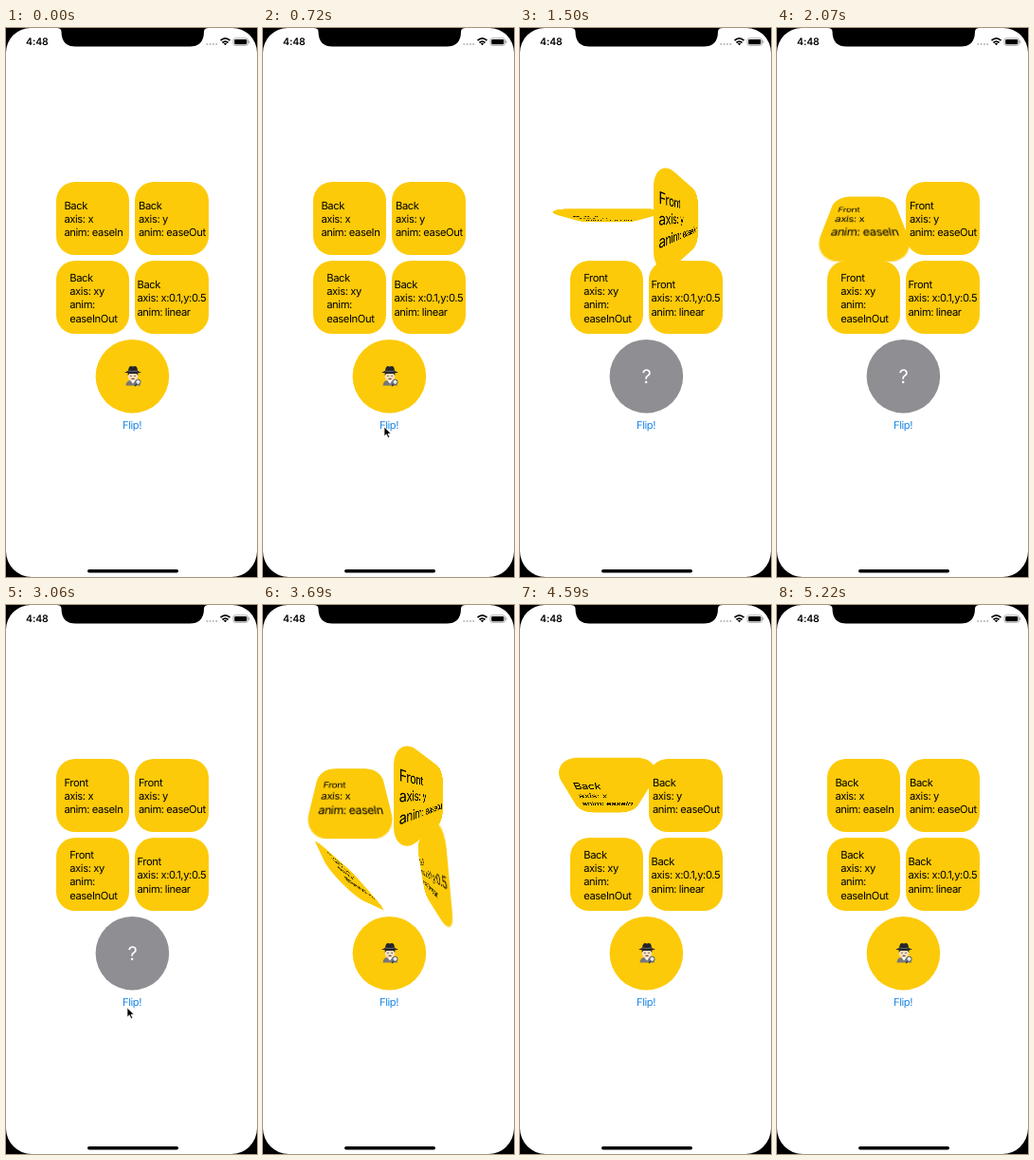
Animation, 265 px wide and 578 px high, one loop 5.49 s. Source, as an HTML page:

```html
<!DOCTYPE html>
<html lang="en">
<head>
<meta charset="utf-8">
<title>Flip cards</title>
<style>
  html, body { margin: 0; width: 100%; height: 100%; overflow: hidden; background: #fff; }
  #stage {
    position: relative; width: 265px; height: 578px; overflow: hidden; background: #fff;
    font: 11.2px/14.35px Inter, Roboto, sans-serif; letter-spacing: -.4px; color: #000;
    text-rendering: geometricPrecision;
  }
  #stage > svg { position: absolute; left: 0; top: 0; }
  .card {
    position: absolute; width: 77.5px; height: 77.5px; border-radius: 20px;
    background: #fcca08; display: flex; align-items: center; white-space: pre;
  }
  .card span { position: relative; top: .8px; }
  #flip { position: absolute; left: 103px; width: 60px; top: 410.5px; text-align: center; color: #1c87e5; }
</style>
</head>
<body>
<div id="stage">
  <svg id="screen" width="265" height="578" viewBox="0 0 265 578">
    <g id="avatar">
      <circle cx="133.4" cy="366.7" r="38.8" fill="#fcca08"/>
      <path d="M126.500 376.500q0-6 7.500-6t8 6z" fill="#77777a"/>
      <path d="M131 370.500l3 4 3-4z" fill="#fff"/>
      <circle cx="134" cy="366.500" r="5.300" fill="#f6dfc0"/>
      <path d="M128.700 366q-.5-3 1-4h8.600q1.500 1 1 4l-1.500-2h-7.600z" fill="#332c28"/>
      <path d="M125 362.700q3-.8 4-2 .5-4.700 3-4.700 2 .8 4 0 2.700 0 3 4.700 1 1.200 4 2-8 2.300-18 0z" fill="#25252a"/>
      <path d="M129 361q5 1.200 10 0" fill="none" stroke="#66666c"/>
      <path d="M131.300 366.300h1.200M135.500 366.300h1.200M132.500 369.300h3" stroke="#3b2a20"/>
      <circle cx="139.500" cy="372.700" r="2.600" fill="#dfe8ee" stroke="#55555a"/>
      <path d="M138 375l-2 2" stroke="#33333a" stroke-width="1.300"/>
    </g>
    <g id="mystery">
      <circle cx="133.4" cy="366.7" r="38.8" fill="#8e8e93"/>
      <text x="133.300" y="374" font-size="20" fill="#fff" text-anchor="middle">?</text>
    </g>
  </svg>
  <div id="flip">Flip!</div>
  <svg width="265" height="578" viewBox="0 0 265 578">
    <path fill-rule="evenodd" d="M0 0H265V578H0ZM26 0A26 26 0 0 0 0 26V551A27 27 0 0 0 27 578H238A27 27 0 0 0 265 551V26A26 26 0 0 0 239 0Z"/>
    <path d="M53.500 0Q58.500 0 58.500 4C58.500 15 64.500 19.500 73.500 19.500H194C203 19.500 209 15 209 4Q209 0 214 0Z"/>
    <text x="21" y="18" font-size="10.500" font-weight="600" letter-spacing="-.1">4:48</text>
    <path d="M212.300 17h12" stroke="#b9b9bc" stroke-width="2.200" stroke-linecap="round" stroke-dasharray="0 3.300"/>
    <g fill="none" stroke="#000" stroke-width="1.700">
      <path d="M226.500 13.200q5-4.600 10 0M228.500 15.500q3-2.700 6 0"/>
    </g>
    <path d="M229.800 16.500q1.700-1.300 3.400 0l-1.700 1.800z"/>
    <rect x="240" y="10.800" width="15.500" height="7.600" rx="2.200" fill="none" stroke="#999" stroke-width=".8"/>
    <rect x="241.200" y="12" width="13.100" height="5.200" rx="1.200"/>
    <path d="M256.800 13.300v2.600" stroke="#999"/>
    <rect x="86" y="570" width="96" height="3.400" rx="1.700"/>
    <path id="cursor" d="M0 0V9.800L2.300 7.700 4 11.500 5.700 10.700 4 7.100H7.200Z" stroke="#fff" stroke-width=".7"/>
  </svg>
</div>
<script>
const LOOP = 5490, TO_FRONT = 860, TO_BACK = 3458, HOLD = 10;

// Cubic bezier easing, solved by bisection.
function bezier(x1, y1, x2, y2) {
  const at = (a, b, s) => 3 * a * s * (1 - s) ** 2 + 3 * b * s * s * (1 - s) + s ** 3;
  return x => {
    let lo = 0, hi = 1;
    for (let i = 0; i < 24; i++) {
      const mid = (lo + hi) / 2;
      if (at(x1, x2, mid) < x) lo = mid; else hi = mid;
    }
    return at(y1, y2, lo);
  };
}
const linear = x => x;
const easeIn = bezier(.42, 0, 1, 1);
const easeOut = bezier(0, 0, .58, 1);
const easeInOut = bezier(.42, 0, .58, 1);
const softIn = bezier(.3, .2, .8, .8);

// Each flip has two halves of length `half`; the face changes edge-on.
const cards = [
  { x: 52.95, y: 161.7, pad: 8.5, axis: '1,0,0', half: 700, ease: [softIn, easeIn],
    text: 'axis: x\nanim: easeIn' },
  { x: 136.3, y: 161.7, pad: 3.7, axis: '0,1,0', half: 520, ease: [easeOut, easeOut],
    text: 'axis: y\nanim: easeOut' },
  { x: 52.95, y: 244.9, pad: 14.3, axis: '1,1,0', half: 285, ease: [easeInOut, easeInOut],
    text: 'axis: xy\nanim:\neaseInOut' },
  { x: 136.3, y: 244.9, pad: 2.2, axis: '.1,.5,0', half: 190, ease: [linear, linear],
    text: 'axis: x:0.1,y:0.5\nanim: linear' }
];

const $ = id => document.getElementById(id);
for (const c of cards) {
  c.el = document.createElement('div');
  c.el.className = 'card';
  c.label = document.createElement('span');
  c.label.style.marginLeft = c.pad + 'px';
  c.el.style.left = c.x + 'px';
  c.el.style.top = c.y + 'px';
  c.el.append(c.label);
  $('stage').insertBefore(c.el, $('flip'));
}

function drawCard(c, t) {
  const back = t >= TO_BACK;
  const u = t - (back ? TO_BACK : TO_FRONT);
  const second = u >= c.half + HOLD;
  const part = (second ? u - c.half - HOLD : u) / c.half;
  const k = c.ease[+second](Math.min(1, Math.max(0, part)));
  const angle = (second ? 90 * k - 90 : 90 * k) * (back ? 1 : -1);
  const word = second === back ? 'Back' : 'Front';
  if (c.word !== word) c.label.textContent = (c.word = word) + '\n' + c.text;
  c.el.style.transform = Math.abs(angle) > .01
    ? `perspective(77.5px) rotate3d(${c.axis},${angle}deg)` : 'none';
}

function drawCursor(t) {
  const first = t >= 480 && t < 840;
  const second = t >= 2880 && t < 3430;
  const k = Math.min(1, Math.max(0, (t - 2880) / 170));
  const [x, y] = first ? [128, 420] : [124 + 4 * k, 430 - 6 * k];
  $('cursor').setAttribute('transform', `translate(${x} ${y})`);
  $('cursor').style.display = first || second ? '' : 'none';
}

function draw(t) {
  cards.forEach(c => drawCard(c, t));
  const hidden = t >= TO_FRONT && t < TO_BACK;
  $('avatar').style.display = hidden ? 'none' : '';
  $('mystery').style.display = hidden ? '' : 'none';
  drawCursor(t);
}

const start = performance.now();
function tick() {
  draw((performance.now() - start) % LOOP);
  requestAnimationFrame(tick);
}
tick();
</script>
</body>
</html>
```
